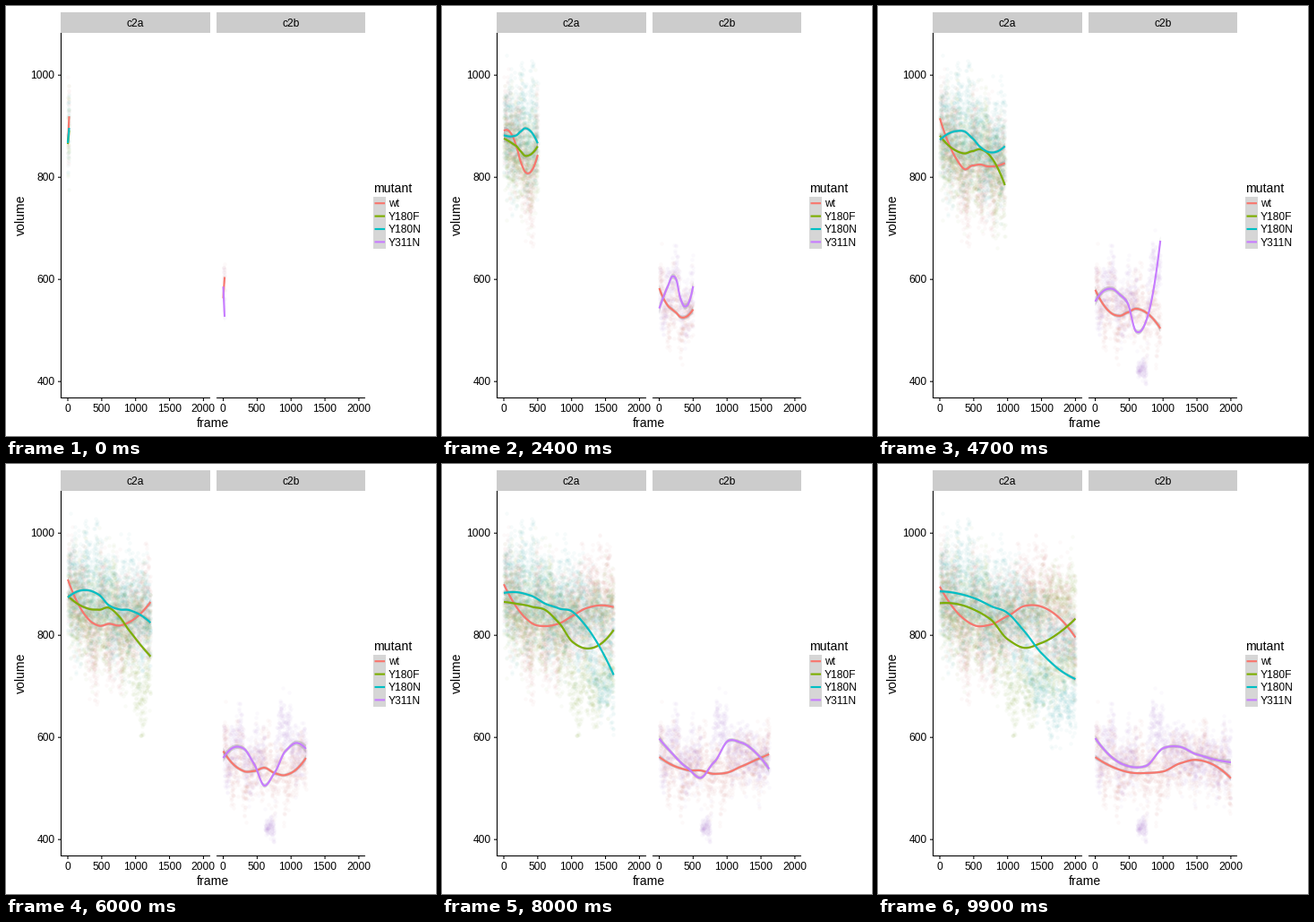
A matplotlib script for the animation above (10 s loop, 480 by 480 pixels).

```python
import numpy as np
import matplotlib.pyplot as plt
from matplotlib.animation import FuncAnimation
from matplotlib.colors import to_rgb
from matplotlib.patches import Polygon, Rectangle

SIZE, FRAMES, STEP = 480, 100, 20
PT = 0.72  # points per pixel at 100 dpi
RED, GREEN, TEAL, PURPLE = "#F8766D", "#7CAE00", "#00BFC4", "#C77CFF"
PANELS = {"c2a": (61, 228), "c2b": (235, 401)}
ORIGIN = {"c2a": 69.0, "c2b": 242.5}
GRID = np.linspace(0, 1, 161)  # where the mean is sampled, as a share of the range
U = np.linspace(0, 1, 81)      # where the smoothed curve is drawn

plt.rcParams["font.family"] = "Liberation Sans"
fig = plt.figure(figsize=(SIZE / 100, SIZE / 100), dpi=100, facecolor="white")
ax = fig.add_axes([0, 0, 1, 1])
ax.set(xlim=(0, SIZE), ylim=(SIZE, 0))
ax.axis("off")


def to_x(panel, t):
    return ORIGIN[panel] + np.asarray(t) * 0.0757


def to_y(v):
    return 77.2 + (1000 - np.asarray(v)) * 0.57


def text(x, y, s, size=12, ha="left", rotation=0):
    ax.text(x, y, s, fontsize=size * PT, ha=ha, va="baseline",
            rotation=rotation, rotation_mode="anchor", color="black", zorder=9)


def rule(xs, ys, color="black", width=1.07):
    ax.plot(xs, ys, color=color, lw=width * PT, solid_capstyle="butt",
            snap=False, zorder=8)


def box(x0, y0, x1, y1, color):
    ax.add_patch(Rectangle((x0, y0), x1 - x0, y1 - y0, fc=color, ec="none", zorder=7))


def loess_matrix(span=0.75, cells=8):
    """Local quadratic fits at cell corners, blended by cubics: GRID -> U."""
    value, slope = [], []
    for corner in np.linspace(0, 1, cells + 1):
        d = GRID - corner
        reach = np.sort(np.abs(d))[int(span * len(d))]
        w = np.clip(1 - np.abs(d / reach) ** 3, 0, None) ** 3
        X = np.vander(d, 3, increasing=True)
        fit = np.linalg.solve(X.T @ (w[:, None] * X), X.T * w)
        value.append(fit[0])
        slope.append(fit[1] / cells)
    value, slope = np.array(value), np.array(slope)
    i = np.minimum((U * cells).astype(int), cells - 1)
    s = (U * cells - i)[:, None]
    rise = s * s * (3 - 2 * s)
    return ((1 - rise) * value[i] + rise * value[i + 1]
            + s * (1 - s) ** 2 * slope[i] - s * s * (1 - s) * slope[i + 1])


LOESS = loess_matrix()


class Series:
    """A noisy point cloud that fills up, with its loess trend and band."""

    def __init__(self, panel, color, seed, runs, spread, band, jolt, mean, split=None):
        self.panel, self.band, self.jolt = panel, band, jolt
        self.times, self.levels = zip(*mean)
        self.scatter(seed, runs, spread, split)
        z = 3 + seed / 10
        self.dots, = ax.plot([], [], "o", ms=4.5 * PT, mew=0, alpha=0.035, zorder=1,
                             color=0.82 * np.array(to_rgb(color)))
        self.ribbon = ax.add_patch(Polygon(np.zeros((3, 2)), fc="#999999", ec="none",
                                           alpha=0.4, zorder=z))
        self.line, = ax.plot([], [], color=color, lw=2.13 * PT,
                             solid_capstyle="butt", zorder=z + 0.05)

    def mean(self, t):
        start = np.where(t <= STEP, self.jolt * (t - 10) / 10, 0)
        return np.interp(t, self.times, self.levels) + start

    def scatter(self, seed, runs, spread, split):
        rng = np.random.default_rng(seed)
        t = np.arange(2, 2001, 4)
        centre = self.mean(t)
        scale = spread * np.where(centre < 450, 0.38, 1)
        shift = np.zeros(t.size)
        if split:
            since, gap = split
            ramp = np.clip((t - since) / 60, 0, 1)
            scale, shift = scale * (1 - 0.35 * ramp), gap * ramp
        clouds = []
        for run in range(runs):
            wave = 0.3 * rng.normal() + 0.55 * rng.normal(size=t.size)
            for _ in range(4):
                period, phase = rng.uniform(70, 350), rng.uniform(0, 2 * np.pi)
                wave += 0.48 * np.sin(2 * np.pi * t / period + phase)
            clouds.append(centre + (-1) ** run * shift + scale * np.clip(wave, -2.7, 2.7))
        self.t = np.repeat(t, runs)
        self.px = to_x(self.panel, self.t)
        self.py = to_y(np.array(clouds).T.ravel())

    def update(self, end):
        n = np.searchsorted(self.t, end, side="right")
        self.dots.set_data(self.px[:n], self.py[:n])
        v, x = LOESS @ self.mean(GRID * end), to_x(self.panel, U * end)
        self.line.set_data(x, to_y(v))
        half = self.band * min(1.2, (1000 / end) ** 0.5) * (1 + np.abs(2 * U - 1) ** 6)
        upper = np.column_stack([x, to_y(v + half)])
        lower = np.column_stack([x, to_y(v - half)])
        self.ribbon.set_xy(np.vstack([upper, lower[::-1]]))


series = [
    Series("c2a", RED, 1, 6, 56, 3, 27, [
        (0, 893), (120, 890), (300, 808), (400, 810), (500, 840), (650, 815),
        (800, 818), (950, 830), (1250, 865), (1600, 853), (2000, 800)]),
    Series("c2a", GREEN, 2, 6, 58, 3, 15, [
        (0, 880), (120, 862), (180, 866), (310, 838), (480, 856), (750, 848),
        (960, 785), (1220, 768), (1500, 795), (2000, 822)], split=(900, 72)),
    Series("c2a", TEAL, 3, 6, 58, 3, 15, [
        (0, 882), (180, 880), (330, 900), (500, 870), (780, 842), (960, 863),
        (1200, 820), (1500, 750), (1650, 735), (2000, 722)], split=(1250, 58)),
    Series("c2b", RED, 4, 3, 36, 3.5, 25, [
        (0, 588), (100, 546), (230, 541), (320, 521), (450, 534), (600, 546),
        (750, 535), (950, 508), (1100, 553), (1300, 550), (1600, 564), (2000, 518)]),
    Series("c2b", PURPLE, 5, 3, 36, 4.5, -30, [
        (0, 556), (100, 560), (200, 620), (260, 600), (360, 528), (480, 578),
        (610, 560), (616, 422), (750, 422), (760, 595), (850, 625), (960, 610),
        (1050, 580), (1300, 570), (1620, 555), (2000, 556)]),
]

for name, (x0, x1) in PANELS.items():
    box(x0, 7, x1, 30, "#CCCCCC")
    text((x0 + x1) / 2, 23.3, name, ha="center")
    rule([x0, x1], [437.5, 437.5])
    for t in range(0, 2001, 500):
        x = to_x(name, t)
        rule([x, x], [437.5, 441])
        text(x - 0.4, 453.3, str(t), ha="center")

rule([61.5, 61.5], [30, 438])
for v in (400, 600, 800, 1000):
    y = to_y(v)
    rule([58, 61.5], [y, y])
    text(54.5, y + 4.2, str(v), ha="right")

text(231.3, 469.6, "frame", 14, "center")
text(21, 233, "volume", 14, "center", 90)
text(410, 208, "mutant", 14)
box(410, 213, 424, 270.5, "#D6D6D6")
legend = [("wt", RED), ("Y180F", GREEN), ("Y180N", TEAL), ("Y311N", PURPLE)]
for i, (label, color) in enumerate(legend):
    y = 220.2 + 14.4 * i
    rule([411.5, 423], [y, y], color, 2.13)
    text(426.7, y + 4.3, label)


def draw(k):
    for s in series:
        s.update(STEP * (k + 1))
    return []


anim = FuncAnimation(fig, draw, frames=FRAMES, interval=100, repeat=True,
                     repeat_delay=0, blit=False)
plt.show()
```
